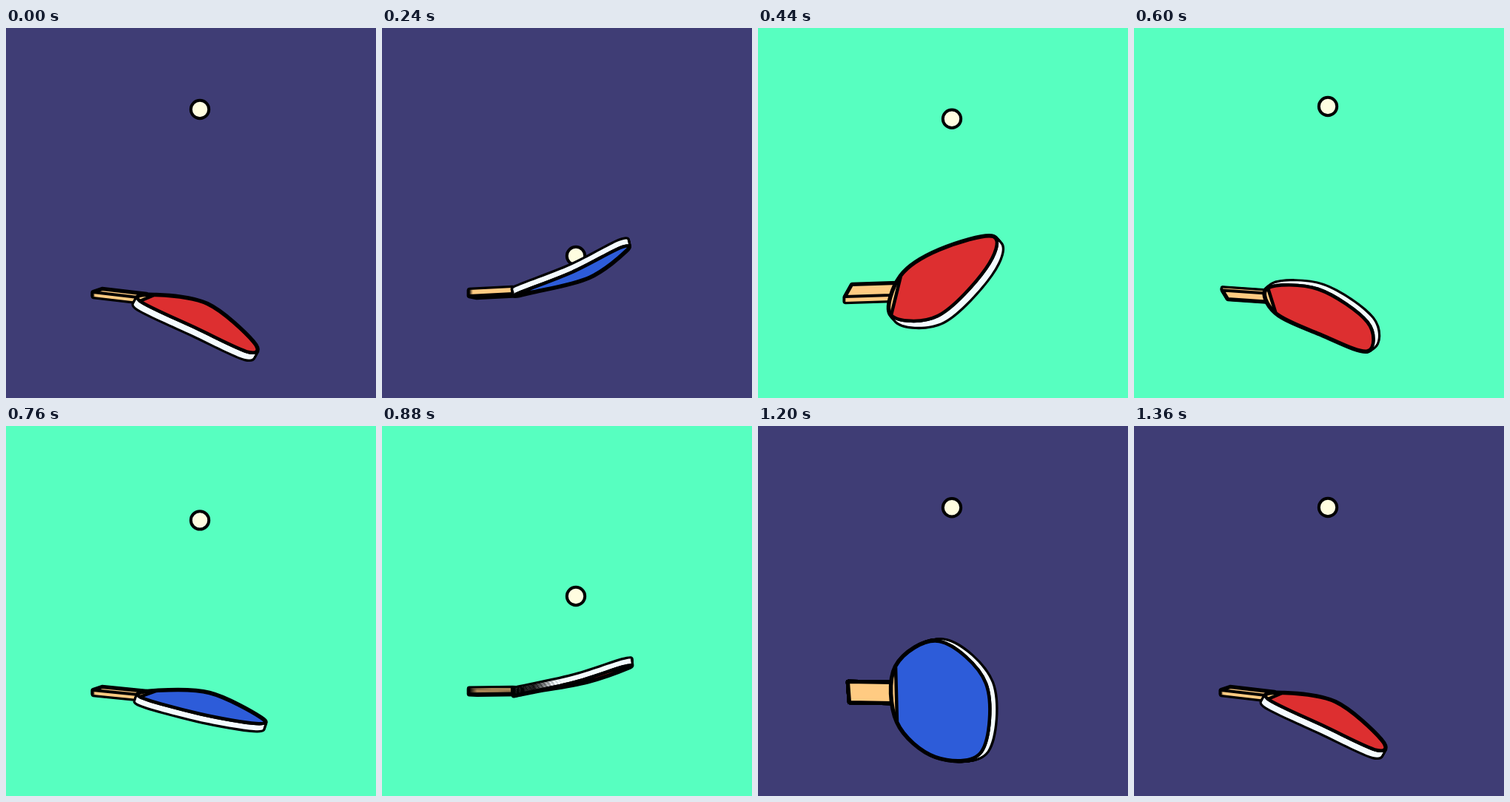
These frames come from a looping animation (500x500 px, 1.4 s). An HTML page with a canvas:

```html
<!DOCTYPE html>
<html lang="en">
<head>
<meta charset="utf-8">
<title>Paddle and ball</title>
<style>
  html, body { margin: 0; width: 100%; height: 100%; overflow: hidden; }
  canvas { display: block; width: 500px; height: 500px; }
</style>
</head>
<body>
<canvas id="stage" width="500" height="500"></canvas>
<script>
const ctx = document.getElementById('stage').getContext('2d');
const RED = '#dd2f30', BLUE = '#2d5cd9', TAN = '#ffcb82', WHITE = '#f4fbff';
const LOOP = 1400, HALF = 680, STEP = 40, HIT = 240, APEX = 600;

// time, six blade points (near edge out, far edge back), blade thickness vector,
// handle outer and inner near corners, handle width vector, handle thickness
const poses = [
  [0, 181,369, 258,406, 328,438, 334,424, 272,373, 200,361, -5,9, 118,357, 178,364, 12,-4, 6],
  [80, 181,366, 262,389, 338,402, 344,394, 275,361, 203,358, -3,9, 118,357, 178,363, 12,-4, 6],
  [240, 179,351, 255,321, 320,288, 328,292, 278,328, 205,347, 2,9, 118,354, 176,351, 10,2, 8],
  [280, 180,355, 256,328, 320,290, 328,291, 277,321, 208,346, 2,8, 118,357, 176,354, 10,-4, 5],
  [440, 180,388, 243,389, 308,325, 318,282, 245,300, 193,335, 7,8, 118,363, 179,361, 9,-16, 7],
  [520, 188,400, 240,447, 302,440, 308,348, 245,291, 186,325, 8,-1, 124,373, 181,374, -2,-27, 0]
].map(([time, ...n]) => {
  const pts = [];
  for (let i = 0; i < 20; i += 2) pts.push([n[i], n[i + 1]]);
  const [outer, inner, width] = pts.slice(7);
  return {
    time,
    blade: pts.slice(0, 6), rim: pts[6],
    handle: [outer, inner, add(inner, width), add(outer, width)], side: [0, n[20]]
  };
});

// After half a turn the underside is on top
const first = poses[0];
const turn = (pts, by) => pts.map(p => add(p, by)).reverse();
poses.push({
  time: HALF,
  blade: turn(first.blade, first.rim), rim: first.rim.map(v => -v),
  handle: turn(first.handle, first.side), side: first.side.map(v => -v)
});

function add(p, q, k = 1) { return [p[0] + q[0] * k, p[1] + q[1] * k]; }

function mix(a, b, k) {
  return Array.isArray(a) ? a.map((v, i) => mix(v, b[i], k)) : a + (b - a) * k;
}

function poseAt(phase) {
  const i = poses.findIndex(p => p.time > phase);
  const a = poses[i - 1], b = poses[i], k = (phase - a.time) / (b.time - a.time);
  const pose = {};
  for (const key of ['blade', 'rim', 'handle', 'side']) pose[key] = mix(a[key], b[key], k);
  return pose;
}

function straight(pts) {
  const path = new Path2D();
  pts.forEach(p => path.lineTo(...p));
  path.closePath();
  return path;
}

function smooth(pts, flatBase) {
  const path = new Path2D(), n = pts.length;
  const at = i => pts[(i + n) % n];
  path.moveTo(...pts[0]);
  for (let i = 0; i < n - (flatBase ? 1 : 0); i++) {
    const p = at(i), q = at(i + 1);
    const start = add(add(p, at(i + 1), 1 / 6), at(i - 1), -1 / 6);
    const end = add(add(q, p, 1 / 6), at(i + 2), -1 / 6);
    path.bezierCurveTo(...start, ...end, ...q);
  }
  path.closePath();
  return path;
}

function paint(path, color, width) {
  ctx.fillStyle = color;
  ctx.fill(path);
  ctx.lineWidth = width;
  if (width) ctx.stroke(path);
}

// Sweeps an outline along its thickness and returns the face turned to the viewer
function solid(pts, depth, outline, color) {
  const layers = [];
  for (let k = 0; k <= 1; k += 0.125) layers.push(outline(pts.map(p => add(p, depth, k))));
  layers.forEach(l => paint(l, '#000', 6.5));
  layers.forEach(l => paint(l, color, 0));
  const area = pts.reduce((sum, p, i) => {
    const q = pts[(i + 1) % pts.length];
    return sum + p[0] * q[1] - q[0] * p[1];
  }, 0);
  const top = area < 0;
  return { top, pts: top ? pts : pts.map(p => add(p, depth)) };
}

function ballY(phase) {
  if (phase > HIT && phase <= APEX) {
    const v = (APEX - phase) / (APEX - HIT);
    return 106 + 202 * (0.42 * v ** 2 + 0.58 * v ** 9.6);
  }
  const u = (phase > APEX ? phase - APEX : phase + HALF - APEX) / (HIT + HALF - APEX);
  return 106 + 202 * (0.3 * u ** 2 + 0.7 * u ** 4.5);
}

function draw(now) {
  const t = Math.floor(now % LOOP / STEP) * STEP;
  const phase = t % HALF, swapped = Math.floor(t / HALF) % 2 === 1;
  const { blade, rim, handle, side } = poseAt(phase);

  ctx.fillStyle = t > HIT && t <= HIT + HALF ? '#57ffc0' : '#3f3d75';
  ctx.fillRect(0, 0, 500, 500);
  ctx.strokeStyle = '#000';
  ctx.lineJoin = 'round';

  const ball = new Path2D();
  ball.arc(262, ballY(phase), 12.2, 0, 7);
  paint(ball, '#fffde0', 4);

  const grip = solid(handle, side, straight, TAN);
  paint(straight(grip.pts), TAN, 4);

  const face = solid(blade, rim, smooth, WHITE);
  paint(smooth(face.pts), TAN, 4.5);
  paint(smooth(face.pts, true), face.top !== swapped ? RED : BLUE, 4.5);

  requestAnimationFrame(tick);
}

const begin = performance.now();
function tick() { draw(performance.now() - begin); }
tick();
</script>
</body>
</html>
```
